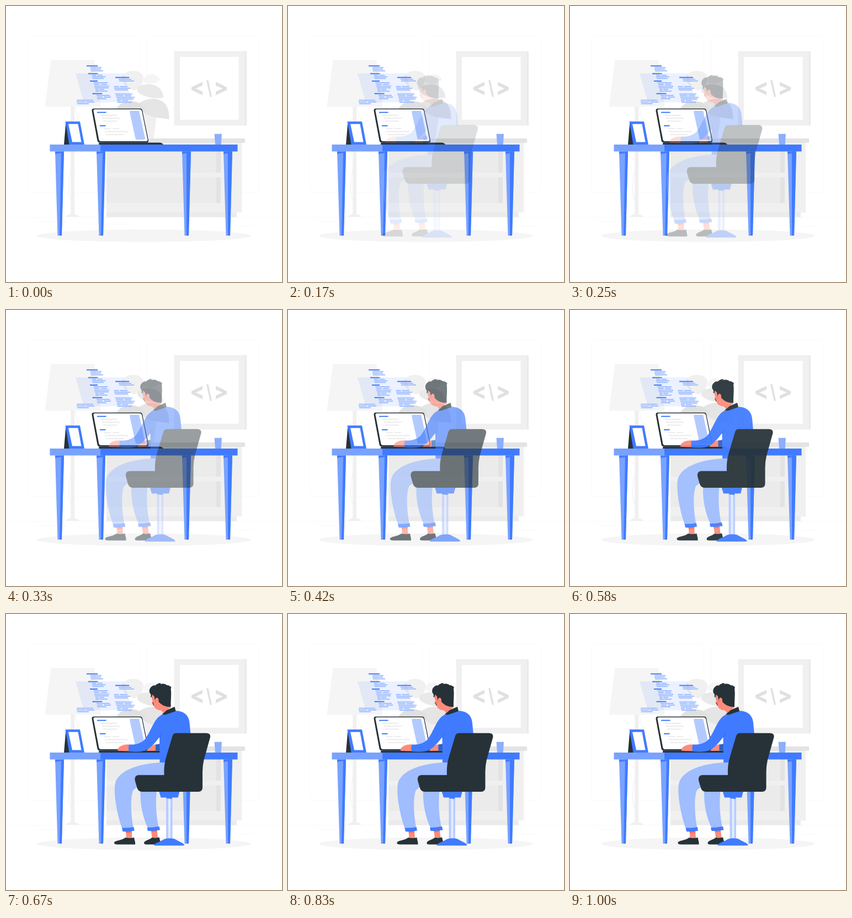
An HTML page that plays this animation: 500 px wide and 500 px high, repeating every 1.04 s.

```html
<!DOCTYPE html>
<html lang="en">
<head>
<meta charset="utf-8">
<title>At the desk</title>
<style>
html, body { margin: 0; height: 100%; overflow: hidden; background: #fff; }
svg { display: block; width: 100vw; height: 100vh; }
.blue { fill: #407bff; }
.sky { fill: #79a2ff; }
.dark { fill: #263238; }
.skin { fill: #ff8b7b; }
.line { fill: none; stroke-width: 2; }
</style>
</head>
<body>
<svg viewBox="0 0 500 500">
  <defs>
    <g id="leg">
      <path class="sky" d="M0 0H16L12 152.500H4.500Z"/>
      <path class="blue" d="M0 0H16V2L0 4.500Z"/>
    </g>
  </defs>

  <!-- room -->
  <g fill="none" stroke="#ebebeb" stroke-width=".3">
    <rect x="39" y="55" width="203.700" height="282.600" rx="5.700"/>
    <rect x="254.800" y="55" width="203.700" height="282.600" rx="5.700"/>
    <path d="M0 382.500H500M417 398.600h33M322 401.300h9M397 389.300h19M52 391h43M105 391h6M131 395.200h94"/>
  </g>
  <ellipse cx="250" cy="416.200" rx="193.900" ry="11.300" fill="#f5f5f5"/>

  <!-- lamp -->
  <path fill="#f0f0f0" d="M117.300 182h6.700V377C129 378 132 380 132.500 382H108.500C109 380 112 378 117.300 377Z"/>
  <path fill="none" stroke="#f0f0f0" d="M125 183Q128 200 134 209M118 295C112 318 112 340 118 355"/>
  <path fill="#f5f5f5" d="M81.500 97.500H160L171.500 182.500H70.500Z"/>

  <!-- picture -->
  <path fill="#f0f0f0" d="M304.500 81.800H436V216.500H304.500Z"/>
  <path fill="#ebebeb" d="M432.500 81.800H436V216.500H432.500Z"/>
  <path fill="#fff" d="M315 92.300H421.500V206H315Z"/>
  <path fill="#e0e0e0" d="M356 137.500V144L343.500 149.500L356 155V161.500L336 152V147ZM363 134.500H366.500L373 164.500H369.500ZM380 137.500V144L392.500 149.500L380 155V161.500L400 152V147Z"/>

  <!-- plant -->
  <path fill="#f5f5f5" d="M249 133C253 123 269 119 279 132C274 140 260 143 250 138Z"/>
  <path fill="#f0f0f0" d="M210 130C215 114 241 113 249 127C250 139 244 148 233 153C222 151 211 143 210 130ZM240 194H274L267 242H242Z"/>
  <path fill="#e9e9e9" d="M238 148C252 137 284 139 285 166C268 169 248 165 238 155Z"/>
  <path fill="#e5e5e5" d="M241 176C260 162 298 163 295.500 205C277 202 253 203 241 184Z"/>
  <path fill="#e0e0e0" d="M198 191C204 169 240 166 252 186L245 200H198Z"/>

  <!-- cabinet -->
  <path fill="#f0f0f0" d="M182 248H427V374H182Z"/>
  <path fill="#ebebeb" d="M182 256H389V302H182ZM182 310.500H389V357H182ZM182 374H418V382.500H182Z"/>
  <path fill="#e3e3e3" d="M381 256H389V302H381ZM381 310.500H389V357H381ZM178 240H433V248H178Z"/>

  <!-- floating code -->
  <path fill="#407bff" opacity=".1" d="M126 122H213L229 174.500H141Z"/>
  <g class="line">
    <path stroke="#407bff" d="M146 108.500h20M149 122.500h17.500M152 136h14M156.500 158.800h18M198 129.500h25"/>
    <g stroke="#9fbdff">
      <path d="M153 111.500h20M153 114.500h19M154 117.500h22M156 125.500h7m2 0h10M156 128.300h24M157 131.300h20M158 139h26M160 142h10m2 0h11M160 145.200h27M161 148.200h25M162 151.200h6m1 0h9M162 154.200h22"/>
      <path d="M164 162h24M165 165h10m2 0h13M165 168h17M128 170.800h30M128 174h15m2 0h15M129 177h21"/>
      <path d="M204 132.800h23M205 135.800h27M195.500 146h9m2 0h13M196 149h29M197 152h24M198 159.500h31M199 162.500h14m2 0h12M200 165.500h33M201 168.500h30M201 171.500h7m2 0h11M202 174.500h26"/>
    </g>
  </g>

  <!-- desk -->
  <use href="#leg" x="89" y="263.500"/>
  <use href="#leg" x="164" y="263.500"/>
  <use href="#leg" x="319" y="263.500"/>
  <use href="#leg" x="394" y="263.500"/>
  <path class="blue" d="M100 263.500H105L101 416H97ZM175 263.500H180L176 416H172ZM327 263.500H335L331 416H327ZM402 263.500H410L406 416H402Z"/>
  <path class="sky" d="M79.500 251H170.500V263.500H79.500Z"/>
  <path class="blue" d="M170.500 251H419.500V263.500H170.500Z"/>
  <path fill="#8caeff" d="M377.500 231.800H391L389.700 251H379Z"/>

  <!-- photo stand -->
  <path class="dark" d="M108.500 209.500L105 251H118Z"/>
  <path class="blue" d="M107.500 209.200H134L142 251H114.500Z"/>
  <path fill="#fff" d="M113 213.700H130.500L136.500 246.500H120Z"/>

  <!-- laptop -->
  <path class="dark" d="M159 185.800H243Q246 185.800 247 189L258 243Q258.500 247.500 255 247.500H170Q166.500 247.500 165.500 244L155.500 190Q155 186 159 185.800Z"/>
  <path fill="#fff" d="M161 187.300H242.500Q245 187.300 246 190L256.500 242Q257 245 254 245H172Q169 245 168.300 242L158.500 190Q158 187.300 161 187.300Z"/>
  <path fill="#b3caff" d="M226 189.700H239Q241 189.700 241.500 191.500L252 240Q252 242 250 242H237Q235 242 234.500 240L224 191.500Q224 189.700 226 189.700Z"/>
  <path class="dark" d="M168 248.500Q168.500 247.500 171 247.500H278Q283 247.500 285 251H168Z"/>
  <g class="line">
    <path stroke="#407bff" d="M165 192.700h16.500M170 217h10.500"/>
    <path stroke="#ebebeb" d="M172 198h29M174 203.300h32M176 208.500h25M178 222.300h12m3 0h12M179 227.500h42M181 233h32"/>
  </g>

  <g id="worker" opacity="0">
    <!-- legs -->
    <path class="skin" d="M216.500 392H227L228 406H217.500ZM262 391H273L274.500 405H264Z"/>
    <path fill="#e0766a" d="M216.500 393H227L227.500 396L217 397ZM262 391.500H273V394L263 395.500Z"/>
    <path class="dark" d="M195.500 415C195 410 208 411 216 405Q223 407 231.500 405L233.500 414V417.500H201Q196 417.500 195.500 415ZM249.500 415C250 410 258 410 264 405Q270 406 277 404.500L279 412V417.500H254Q249.500 417.500 249.500 415Z"/>
    <path fill="#9fbdff" d="M243 316C242 345 247 368 257 389L276 387C271 362 270 340 273 316ZM292 268.500C246 269 203 281 197 308C194 326 201 365 210 389L230.500 388C226 365 224 333 230 319Q236 313 244 312L292 312Z"/>
    <path class="blue" d="M209.500 387.500Q220 388 231 386L232 392.500Q222 395 211 394ZM255 387Q266 387 277 384.800L278.500 391.300Q267 393.500 256.500 393Z"/>

    <!-- arms and torso -->
    <path class="skin" d="M271 236C264 237 259 243 255 246Q254 248 257 248L272 247.500ZM223 236.500C214 235.500 206 239 203 243C201 246 202 248.500 205 248L223 248.500Z"/>
    <path fill="#315fc4" d="M270.500 236.500L279 235V247.500H270.500Z"/>
    <path class="blue" d="M283 182L306 175.500C322 175 331 184 332 197L334 219L310 269H278L277.500 223C267 237 258 247 245 249Q235 250.500 222 249Q220.500 243 222.500 236.500C235 237 246 234 252 226C264 209 268 188 283 182Z"/>
    <path fill="none" stroke="#315fc4" stroke-width=".7" d="M277.500 224Q280 220 281.500 215"/>

    <!-- head -->
    <path class="skin" d="M263.500 145L277 147L281 164H298V169L284 180Q283 175 279 174.500C272 174 268 170 267 165L263.500 162L265 157L263 151Z"/>
    <path class="dark" d="M259.500 142C258 136 262 131 267.500 129L269 130C272 127 276 125 280 125L279 127Q287 125 291 129Q296 129 299 133L298 136C299.500 143 298 154 298 168Q287 169 279 162L276 159L270 160L268 149L264.500 146Q264 150 261.500 151L262 146Z"/>
    <ellipse class="skin" cx="272.800" cy="156.700" rx="3.300" ry="5.200"/>
    <path fill="none" stroke="#263238" d="M262 149L264 150M265.500 160L267 166"/>
    <path class="dark" d="M282 182L291 174L305 168L307 176L288 182.500Z"/>

    <!-- chair -->
    <path fill="#b7ccff" d="M289.500 330H301V410H289.500Z"/>
    <path fill="#e3ebff" d="M293.500 330H297.500V410H293.500Z"/>
    <path class="blue" d="M276.500 321H314L311 332.500H300V335L290 334V332.500H280ZM267.500 419C269 414 279 413 284 409C289 405.500 302 405.500 307 408.500C312 412 320 414 323 418.500L321 419.500H269Z"/>
    <path class="dark" d="M301 221Q302.500 215.700 308 215.700H362Q370.500 215.700 369.500 223L358 264Q355.500 275 355.500 286V315Q355 322 348 322H246Q239 322 237 315L233.200 302Q231.500 292 240 291.800H286C285.500 277 287 268 290 258Z"/>
  </g>
</svg>
<script>
const LOOP = 1040, STEP = 1000 / 24, LEAD = 0.035;
const worker = document.getElementById("worker");

const bezier = (a, b, s) => 3 * (1 - s) ** 2 * s * a + 3 * (1 - s) * s * s * b + s ** 3;

// Ease with a late overshoot: cubic-bezier(.36, -.01, .5, 1.38)
function ease(t) {
  let low = 0, high = 1;
  for (let i = 0; i < 24; i++) {
    const mid = (low + high) / 2;
    if (bezier(0.36, 0.5, mid) < t) low = mid; else high = mid;
  }
  return bezier(-0.01, 1.38, high);
}

function draw() {
  const ms = performance.now() % LOOP;
  const tick = Math.floor((ms + 4) / STEP);
  const p = tick ? ease(Math.min(1, tick * STEP / 1000 + LEAD)) : 0;
  worker.setAttribute("transform", `translate(${30 * (p - 1)} 0)`);
  worker.setAttribute("opacity", Math.max(0, Math.min(1, p)));
  requestAnimationFrame(draw);
}
draw();
</script>
</body>
</html>
```
